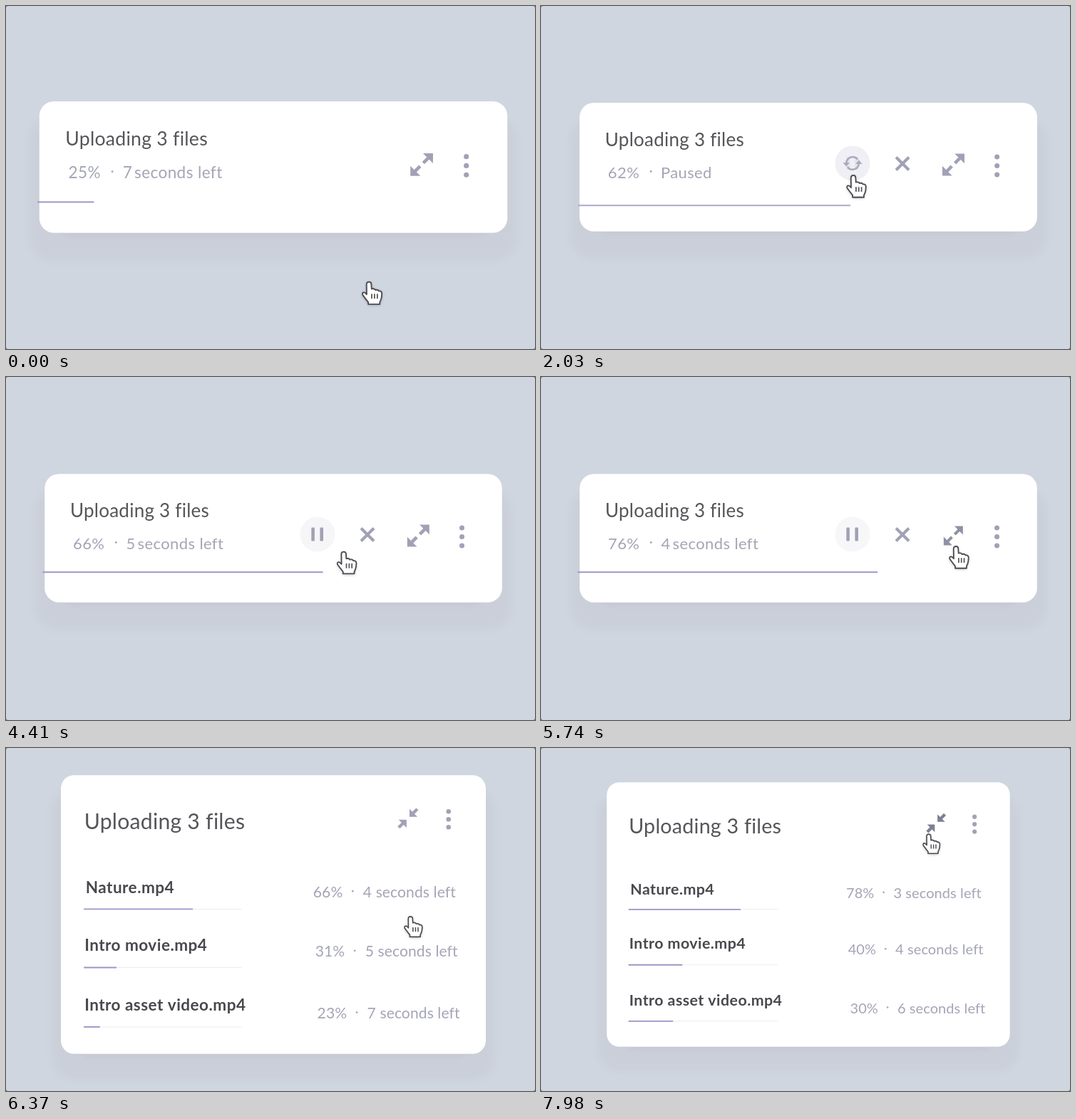
An HTML page with a canvas for the animation above (8 s loop, 742 by 482 pixels).

```html
<!DOCTYPE html>
<html lang="en">
<head>
<meta charset="utf-8">
<title>Upload card</title>
<style>
  html, body { margin: 0; width: 100%; height: 100%; overflow: hidden; background: #666a70; }
  canvas { display: block; width: 742px; height: 482px; background: #cfd6e0; border-radius: 3px; }
</style>
</head>
<body>
<canvas id="stage" width="742" height="482"></canvas>
<script>
const ctx = document.getElementById('stage').getContext('2d');
const LOOP = 8000, CX = 375, WIDTH = 641.5, OPEN_SCALE = 641.5 / 566;
const ICON = '#a1a1b6', DARK = '#7f7f93', GREY = '#a4a5b6', PURPLE = '#9c95c8';

const mix = (a, b, k) => a + (b - a) * k;
const clamp = x => Math.min(1, Math.max(0, x));
const ramp = (t, a, b) => clamp((t - a) / (b - a));
const smooth = x => x * x * (3 - 2 * x);
const easeOut = x => 1 - (1 - x) ** 3;
const fade = (t, a, b) => smooth(ramp(t, a, b));
const dip = (t, at, len) => Math.sin(Math.PI * ramp(t, at, at + len));
const linear = x => x;

// Interpolates through [time, value] pairs.
function track(t, keys, ease = linear) {
  let i = 1;
  while (i < keys.length - 1 && t > keys[i][0]) i++;
  const [[t0, a], [t1, b]] = [keys[i - 1], keys[i]];
  return mix(a, b, ease(ramp(t, t0, t1)));
}

function mixColor(a, b, k) {
  const part = (c, i) => parseInt(c.slice(i, i + 2), 16);
  return `rgb(${[1, 3, 5].map(i => Math.round(mix(part(a, i), part(b, i), k)))})`;
}

function text(str, x, y, size, color, spacing = 0.1, weight = 400) {
  ctx.font = `${weight} ${size}px Lato, sans-serif`;
  ctx.letterSpacing = spacing + 'px';
  ctx.fillStyle = color;
  ctx.fillText(str, x, y);
}

function dot(x, y, r, color) {
  ctx.fillStyle = color;
  ctx.beginPath();
  ctx.arc(x, y, r, 0, 7);
  ctx.fill();
}

function stroke(points, width, color) {
  ctx.beginPath();
  points.forEach(([x, y]) => ctx.lineTo(x, y));
  ctx.lineWidth = width;
  ctx.strokeStyle = color;
  ctx.stroke();
}

function triangle(points, color) {
  ctx.fillStyle = color;
  ctx.beginPath();
  points.forEach(([x, y]) => ctx.lineTo(x, y));
  ctx.fill();
}

// Runs draw() around a local origin with its own scale and opacity.
function group(x, y, scale, alpha, draw) {
  if (alpha <= 0) return;
  ctx.save();
  ctx.translate(x, y);
  ctx.scale(scale, scale);
  ctx.globalAlpha *= alpha;
  draw();
  ctx.restore();
}

function roundRect(x, y, w, h, r, color) {
  ctx.fillStyle = color;
  ctx.beginPath();
  ctx.roundRect(x, y, w, h, r);
  ctx.fill();
}

function card(cy, h) {
  const x = CX - WIDTH / 2, y = cy - h / 2;
  ctx.save();
  ctx.filter = 'blur(5px)';
  roundRect(x - 13, y + 22, WIDTH + 26, h + 16, 32, 'rgba(175,155,160,.11)');
  ctx.filter = 'blur(2px)';
  roundRect(x + 24, y + h - 40, WIDTH - 48, 47, 20, 'rgba(160,155,170,.08)');
  ctx.restore();
  roundRect(x, y, WIDTH, h, 20, '#fff');
}

function pauseIcon() {
  roundRect(-8.7, -9.5, 4.6, 19, 1, ICON);
  roundRect(3.4, -9.5, 4.6, 19, 1, ICON);
}

function resumeIcon() {
  for (let i = 0; i < 2; i++) {
    ctx.beginPath();
    ctx.arc(0, 0, 9.5, Math.PI, Math.PI * 1.8);
    ctx.lineWidth = 2.8;
    ctx.strokeStyle = ICON;
    ctx.stroke();
    triangle([[-14.5, -1], [-4.5, -1], [-9.5, 5]], ICON);
    ctx.rotate(Math.PI);
  }
}

function expandIcon(color) {
  for (let i = 0; i < 2; i++) {
    triangle([[1.8, -15.5], [15.5, -15.5], [15.5, -1.8]], color);
    stroke([[9, -9], [2.2, -2.2]], 4.6, color);
    ctx.rotate(Math.PI);
  }
}

function collapseIcon(color) {
  for (let i = 0; i < 2; i++) {
    triangle([[2.2, -2.2], [2.2, -14.2], [14.2, -2.2]], color);
    stroke([[7, -7], [14, -14]], 4.8, color);
    ctx.rotate(Math.PI);
  }
}

const HAND = new Path2D('M-3.4 3.5Q-3.4 0 0 0Q3.4 0 3.4 3.5L3.8 10Q8 9 9 11.5Q13 10.5 14 13' +
  'Q18.5 12.5 18.5 17L18 22Q17.3 26 15.5 29L15.5 32L-1 32L-1 29Q-5 24 -9 18.5Q-10 15 -7 15Q-5.5 15 -3.2 18Z');

function hand() {
  ctx.save();
  ctx.shadowColor = 'rgba(0,0,0,.3)';
  ctx.shadowBlur = 4;
  ctx.shadowOffsetY = 1;
  ctx.fillStyle = '#fff';
  ctx.fill(HAND);
  ctx.restore();
  ctx.lineWidth = 1.9;
  ctx.lineJoin = 'round';
  ctx.strokeStyle = '#4b4b50';
  ctx.stroke(HAND);
  for (const x of [4, 8, 12]) stroke([[x, 17], [x, 24]], 1.7, '#4b4b50');
}

function header(t, e) {
  text('Uploading 3 files', mix(90, 89.4, e), mix(197, 104.8, e), mix(26, 32.5, e), '#55555a', 0.25);
  const y = mix(224.5, 90, e), gap = mix(12.5, 11.8, e);
  for (const i of [-1, 0, 1]) dot(639.5, y + i * gap, 3.5, ICON);

  const iconY = mix(223, 88.4, e), swap = fade(e, 0.3, 0.7);
  const press = 1 - 0.13 * fade(t, 5450, 5700);
  const hover = mixColor(ICON, DARK, 0.5 * fade(t, 4950, 5250));
  group(578.3, iconY, press, 1 - swap, () => expandIcon(hover));
  group(578.3, iconY, 1, swap, () => collapseIcon(mixColor(ICON, DARK, fade(t, 7450, 7750))));
}

function summary(t) {
  const paused = t > 1880 && t < 3560;
  const percent = track(t, [[0, 25], [980, 44.2], [1880, 62], [3700, 62], [5740, 76.1]]);
  text(Math.floor(percent + 0.01) + '%', 94, 242, 22, GREY, 0.4);
  dot(154.3, 232.5, 1.4, GREY);
  if (paused) {
    text('Paused', 168, 242, 22, GREY, 0.4);
  } else {
    const seconds = t < 1500 ? 7 : t < 1880 ? 6 : t < 4700 ? 5 : 4;
    text(seconds, 168.5, 242, 22, GREY, 0.4);
    text('seconds left', 184.5, 242, 22, GREY, 0.4);
  }

  const down = fade(t, 1850, 2400) - fade(t, 3400, 4000);
  const end = track(t, [[0, 129], [1830, 434], [3900, 434], [5740, 472]]);
  const y = mix(274.3, 298, down);
  stroke([[mix(51.5, 55, down), y], [end, y]], 2, mixColor(PURPLE, '#d9dce3', down));

  const shown = fade(t, 400, 800);
  const resume = fade(t, 1880, 2080) - fade(t, 3560, 3760);
  const press = 1 - 0.14 * (dip(t, 1760, 320) + dip(t, 3440, 320));
  const hover = fade(t, 700, 950) * (1 - 0.5 * fade(t, 4150, 4500));
  group(437, 221, 1, shown, () => {
    dot(0, 0, 24.5, mixColor('#ffffff', '#efeff5', hover));
    group(0, 0, press, 1 - resume, pauseIcon);
    group(0, 0, press, resume, resumeIcon);
  });
  group(507, 221.5, 1, shown, () => {
    stroke([[-9, -9], [9, 9]], 4, ICON);
    stroke([[9, -9], [-9, 9]], 4, ICON);
  });
}

const FILES = [
  { name: 'Nature.mp4', x: 125, y: 226.8, base: 205.5, stat: [428, 211], percent: [66, 70, 78], end: [267.7, 273.6, 280], left: 4 },
  { name: 'Intro movie.mp4', x: 123.5, y: 304.8, base: 282.3, stat: [430.7, 290.5], percent: [31, 36, 40], end: [166, 174, 198], left: 5 },
  { name: 'Intro asset video.mp4', x: 123.5, y: 384, base: 362.5, stat: [433.5, 372.8], percent: [23, 27, 30], end: [144, 154.6, 185], left: 7 }
];

function fileList(t) {
  const at = values => track(Math.max(t, 6000), [6370, 6860, 7980].map((time, i) => [time, values[i]]));
  for (const f of FILES) {
    const [x, y] = f.stat;
    text(f.name, f.x, f.base, 21.4, '#48484e', 0.45, 700);
    stroke([[122.5, f.y], [332.5, f.y]], 1, '#ececf0');
    stroke([[122.5, f.y], [at(f.end), f.y]], 1.8, PURPLE);
    text(Math.floor(at(f.percent) + 0.01) + '%', x, y, 20, GREY);
    dot(x + 52.7, y - 8.2, 1.3, GREY);
    text(`${f.left - (t > 7400)} seconds left`, x + 66.5, y, 20, GREY);
  }
}

function cursor(t) {
  const x = track(t, [[0, 506], [70, 506], [960, 446], [1350, 438], [4080, 438], [5100, 582], [6950, 582], [7750, 566.5]], smooth);
  const y = track(t, [[0, 384], [70, 384], [960, 241.5], [1350, 238], [5740, 238], [6370, 237], [6950, 237], [7750, 106]], smooth);
  group(x, y + 9 * dip(t, 4080, 1020), 0.96, 1, hand);
}

function draw(t) {
  const open = easeOut(ramp(t, 5800, 6250));
  const cy = mix(226.4, 234, open);
  const width = t < 5833 ? WIDTH + 15 * Math.exp(-t / 547)
                         : 563 + 78.5 * Math.exp(-(t - 5833) / 620);
  const zoom = width / WIDTH;

  ctx.clearRect(0, 0, 742, 482);
  ctx.save();
  ctx.translate(CX, cy);
  ctx.scale(zoom, zoom);
  ctx.translate(-CX, -cy);
  card(cy, mix(180.5, 421.6, open));
  group(0, 0, 1, 1 - fade(t, 5800, 5920), () => summary(t));
  group(CX, 234, OPEN_SCALE, fade(t, 5940, 6200), () => {
    ctx.translate(-CX, -234);
    fileList(t);
  });
  header(t, open);
  cursor(t);
  ctx.restore();
}

const start = performance.now();
function frame() {
  draw((performance.now() - start) % LOOP);
  requestAnimationFrame(frame);
}
frame();
</script>
</body>
</html>
```
